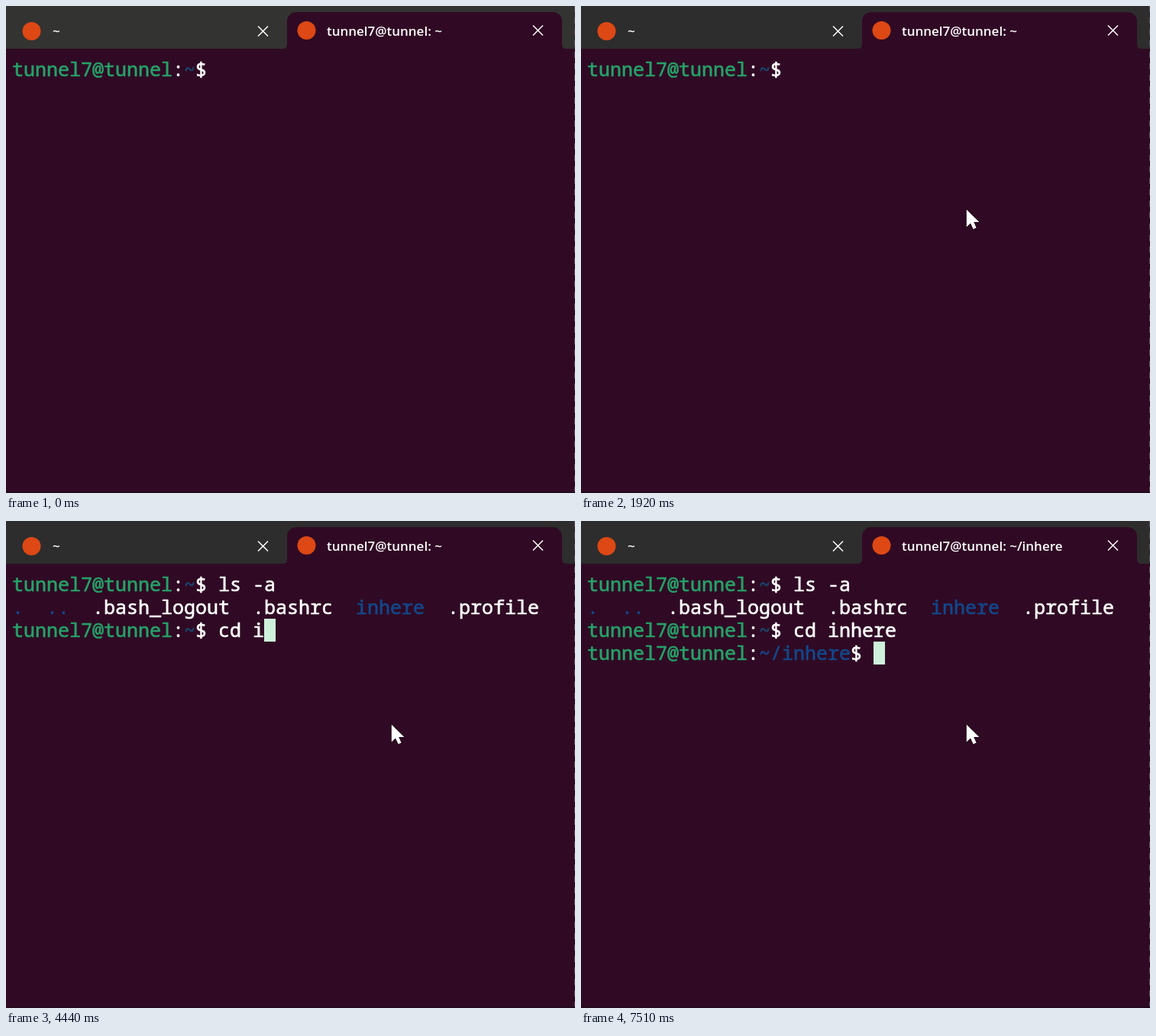
An HTML page that plays this animation: 745 by 638 pixels, repeating every 8 s.

```html
<!DOCTYPE html>
<html lang="en">
<head>
<meta charset="utf-8">
<title>Terminal</title>
<style>
  html, body { margin: 0; width: 100%; height: 100%; overflow: hidden; background: #300a24; }
  svg { display: block; width: 745px; height: 638px; }
  text { white-space: pre; fill: #fff; }
  .term text { font: 500 25px "Noto Sans Mono", monospace; stroke: #fff; stroke-width: .6; }
  .tab { font: 600 17px "Open Sans", sans-serif; }
  .term .user { fill: #26a269; stroke: #26a269; }
  .term .dir { fill: #12488b; stroke: #12488b; }
  .term .dim { fill: #17496f; stroke: #17496f; }
  .close { stroke: #fff; stroke-width: 1.5; fill: none; }
  #mouse { fill: #fff; stroke: #1c0716; stroke-width: 1.4; paint-order: stroke; }
</style>
</head>
<body>
<svg viewBox="0 0 745 638">
  <rect width="745" height="638" fill="#300a24"/>
  <rect y="636" width="745" height="2" fill="#220a1c"/>
  <rect id="bar" width="745" height="56"/>
  <path d="M362 56Q368 56 368 50V20A12 12 0 0 1 380 8H716A12 12 0 0 1 728 20V50Q728 56 734 56Z" fill="#300a24"/>
  <path d="M744.5 0V636" stroke="#65505e" stroke-dasharray="8 7"/>

  <circle cx="33.5" cy="33" r="12" fill="#dd4814"/>
  <circle cx="393.5" cy="32" r="12" fill="#dd4814"/>
  <text class="tab" x="61" y="39">~</text>
  <text class="tab" id="title" x="420" y="39"></text>
  <path class="close" d="M330 26.5l13 13m0-13l-13 13M690 25.5l13 13m0-13l-13 13"/>

  <g class="term">
    <text x="8" y="92"><tspan class="user">tunnel7@tunnel</tspan>:<tspan class="dim">~</tspan>$ <tspan id="cmd1"></tspan></text>
    <g id="listing">
      <text x="8" y="122"><tspan class="dir">.  ..</tspan>  .bash_logout  .bashrc  <tspan class="dir">inhere</tspan>  .profile</text>
      <text x="8" y="152"><tspan class="user">tunnel7@tunnel</tspan>:<tspan class="dim">~</tspan>$ <tspan id="cmd2"></tspan></text>
    </g>
    <text id="last" x="8" y="182"><tspan class="user">tunnel7@tunnel</tspan>:<tspan class="dir">~/inhere</tspan>$ </text>
    <rect id="caret" width="15" height="30" fill="#cff1dc"/>
  </g>

  <path id="mouse" d="M.8 .8V23.4L6 18.5 9.6 26.2 13.6 24.4 10.2 17H17.4Z"/>
</svg>
<script>
  const LOOP = 8000, CELL = 15, ROW = 30, TICK = 1000 / 15;
  const LIST_AT = 3050, DONE_AT = 5310, FOCUS_AT = 860;
  const MOVE = { start: 70, end: 800, from: [736, 452], bend: [560, 401], to: [504, 266] };

  // [time, letters typed]
  const KEYS1 = [[0, 0], [2440, 1], [2580, 3], [2710, 4], [2910, 5]];
  const KEYS2 = [[0, 0], [3980, 1], [4180, 2], [4310, 3], [4440, 4], [4640, 5],
                 [4780, 6], [4910, 7], [4980, 8], [5180, 9]];
  // [time, caret shown]
  const BLINK = [[0, 0], [1390, 1], [1920, 0], [2380, 1], [3650, 0], [3910, 1],
                 [5910, 0], [6450, 1], [6980, 0], [7510, 1]];

  const $ = id => document.getElementById(id);
  const [bar, title, cmd1, cmd2, listing, last, caret, mouse] =
    ["bar", "title", "cmd1", "cmd2", "listing", "last", "caret", "mouse"].map($);
  const at = (steps, t) => steps.findLast(s => s[0] <= t)[1];
  const show = (el, on) => el.setAttribute("visibility", on ? "visible" : "hidden");
  const put = (el, s) => { if (el.textContent !== s) el.textContent = s; };

  function drawMouse(t) {
    const tick = Math.floor((t + 4) / TICK) * TICK;
    const p = Math.min(1, Math.max(0, (tick - MOVE.start) / (MOVE.end - MOVE.start)));
    const e = 1 - (1 - p) ** 2, r = 1 - e;
    const [x, y] = [0, 1].map(i =>
      r * r * MOVE.from[i] + 2 * r * e * MOVE.bend[i] + e * e * MOVE.to[i]);
    mouse.setAttribute("transform", `translate(${x} ${y})`);
    show(mouse, t >= MOVE.start);
  }

  function draw(t) {
    const n1 = at(KEYS1, t), n2 = at(KEYS2, t);
    const listed = t >= LIST_AT, done = t >= DONE_AT;
    put(cmd1, "ls -a".slice(0, n1));
    put(cmd2, "cd inhere".slice(0, n2));
    put(title, "tunnel7@tunnel: ~" + (done ? "/inhere" : ""));
    show(listing, listed);
    show(last, done);

    const col = done ? 25 : 18 + (listed ? n2 : n1);
    const row = done ? 3 : listed ? 2 : 0;
    caret.setAttribute("x", 8 + col * CELL);
    caret.setAttribute("y", 68 + row * ROW);
    show(caret, at(BLINK, t));

    bar.setAttribute("fill", t < FOCUS_AT ? "#333331" : "#2d2d2d");
    drawMouse(t);
  }

  const begin = performance.now();
  function frame() {
    draw((performance.now() - begin) % LOOP);
    requestAnimationFrame(frame);
  }
  frame();
</script>
</body>
</html>
```
